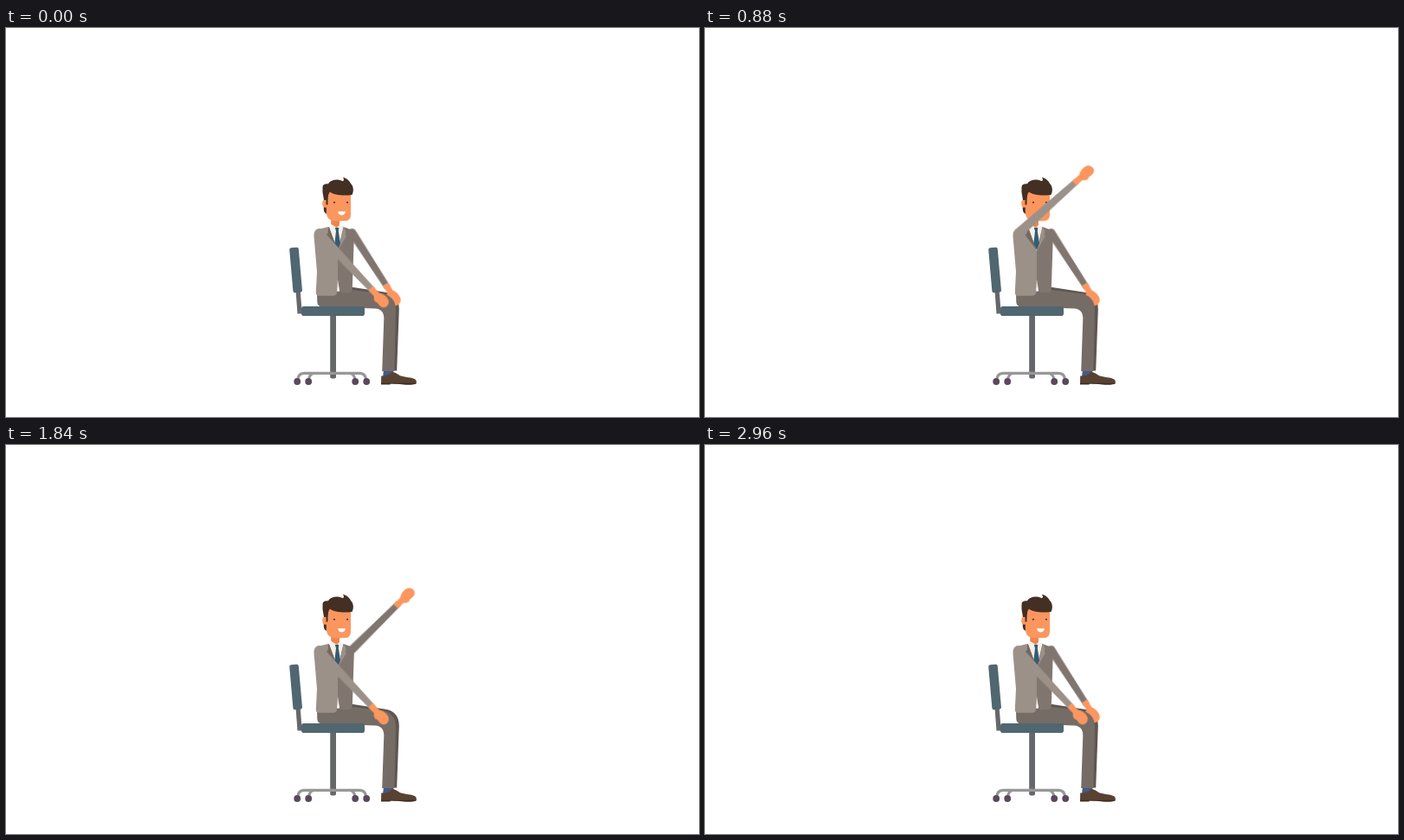
An HTML page for the animation above (3 s loop, 800x450 px).

```html
<!DOCTYPE html>
<html lang="en">
<head>
<meta charset="utf-8">
<title>Seated arm raises</title>
<style>
  html, body { margin: 0; width: 100%; height: 100%; overflow: hidden; background: #fff; }
  svg { display: block; width: 100vw; height: 100vh; }

  .arm { animation: 3s infinite cubic-bezier(.22, 0, .32, 1); transform-origin: 0 0; }
  .near .arm { animation-name: near-raise; }
  .far .arm { animation-name: far-raise; }

  @keyframes near-raise {
    0%, 45.333%, 100% { transform: rotate(46.8deg); }
    18.667%, 24% { transform: rotate(-90deg); }
  }
  @keyframes far-raise {
    0%, 52%, 98.667%, 100% { transform: rotate(57.2deg); }
    72%, 78.667% { transform: rotate(-85deg); }
  }

  .skin { fill: #fb965f; }
  .hair { fill: #432f23; }
  .light { fill: #9c9188; }
  .mid { fill: #81766f; }
  .trouser { fill: #766c66; }
  .shade { fill: #5f5651; }
  .teal { fill: #506670; }
  .metal { fill: #66676a; }
  .wheel { fill: #5b485c; }
  .base { fill: none; stroke: #979798; stroke-width: 3.2; }
</style>
</head>
<body>
<svg viewBox="0 0 800 450">
  <defs>
    <!-- Fist with thumb, starting at the cuff and pointing along +x -->
    <path id="hand" class="skin" d="M-3-3.5H8C11-6 15-6.6 19-6C23-5.4 25.2-2.5 25 .8C24.8 4.2 22.5 6.2 19 6.2L14.5 5.8C12.5 7.3 9 7 7.5 4.6L6 3.6H-3Z"/>
    <g id="half-base">
      <path class="base" d="M336.500 408C337 402 339.500 399.300 344 399.300H377"/>
      <path class="base" d="M349.500 408C349.500 403.500 351 400.500 355 399.500"/>
      <circle class="wheel" cx="336.200" cy="409" r="3.900"/>
      <circle class="wheel" cx="349.200" cy="409" r="3.900"/>
    </g>
  </defs>

  <g id="chair">
    <path class="metal" d="M334.500 304H339.700L341.800 330.500H336.500Z"/>
    <rect class="teal" x="-5.300" y="-26" width="10.600" height="52" rx="2.200" transform="translate(334.600 280) rotate(-5)"/>
    <path class="metal" d="M374.200 332H381V403.500Q381 405.500 379 405.500H376.200Q374.200 405.500 374.200 403.500Z"/>
    <use href="#half-base"/>
    <use href="#half-base" transform="matrix(-1 0 0 1 752.400 0)"/>
  </g>

  <path class="shade" d="M385 298L401 300L437 305.500C447 306.500 454 313 453.800 325L451.200 396.500H440L442 322L385 312Z"/>

  <g class="far" transform="translate(399.500 236.700)">
    <g class="arm">
      <path class="mid" d="M0-4.700L76-3.400V3.400L0 4.700A4.700 4.700 0 0 1 0-4.700Z"/>
      <use href="#hand" x="74"/>
    </g>
  </g>

  <g id="legs">
    <path fill="#42598a" d="M436 395H447.500L446.500 404H435Z"/>
    <path fill="#5a4232" d="M433.200 402.500C438 403 442 402 445.500 398.300C448.500 397.300 451.500 400.500 455 402.200C460 404 469 404 472.500 406.500C474 407.700 474.200 410 473.500 411.500H433Z"/>
    <path fill="#3f2d23" d="M433 410.700H473.800C473 412.200 470 412.700 464 412.700C457 412.700 452 411.500 443.500 411.500V412.600H433Z"/>
    <path class="trouser" d="M359 307L390 304L401 303L432 307C443 308 450 314 450 326L448.300 397H434.200L436.300 336C436.300 329 433 325 426 324.600L365 322.500Q359.500 322 359.300 317Z"/>
  </g>
  <rect class="teal" x="341" y="322" width="73" height="11" rx="2.800"/>

  <g id="torso">
    <path fill="#f4f1e9" d="M373 229L390 229L387 300H380Z"/>
    <path class="mid" d="M389.500 230L397.500 233Q402 235.500 401.800 241L399.800 302Q399.600 306 396 306H388.500Q385 306 384.700 302L383 291V258Z"/>
    <path class="light" d="M372 230L361 232.800Q355 235 355.500 241L359 282L357.800 306Q357.800 309.500 361 309.700H378Q382 309.500 382.200 305L383 291V258Z"/>
    <path fill="#746961" d="M372 230L373.500 231L383 257L369.500 239.500L371.800 237Z"/>
    <path fill="#f4f1e9" d="M373 229.500H380L383 257Z"/>
    <path class="light" d="M390 230L392.500 235.500L391.500 239L392.800 241L383.300 257Z"/>
    <path fill="#365b70" d="M379.800 231H384.300L383.800 235L386 249L383 257L379.400 249L381 235Z"/>
  </g>

  <g id="head">
    <path fill="#ec8552" d="M375.200 220H385V228L382 231L375.200 227Z"/>
    <path class="hair" d="M366.800 206H371V215.500Q367 214 366.800 210Z"/>
    <ellipse class="skin" cx="368.500" cy="203" rx="3.300" ry="4.700"/>
    <path class="skin" d="M370 187H398V216Q398 223.300 391 223.300H380Q370.500 223 369.800 214Z"/>
    <path class="hair" d="M367 199L365.500 190V184Q365.500 179.800 372 180.200C375 175 383 174.300 389 177.200Q391 175.500 388.800 172.800C394 174 396.500 177 398 180C401.500 183 401.600 189 399.500 193C390 194.300 378 193.500 374 189.500C371.500 192.500 371.700 197 371.500 204.500H369.500V199Z"/>
    <circle cx="379" cy="201.800" r="1.050" fill="#40332b"/>
    <circle cx="394" cy="201.800" r="1.050" fill="#40332b"/>
    <path fill="#fff" d="M383 212.300H391.800C391.500 218 383.700 218 383 212.300Z"/>
  </g>

  <g class="near" transform="translate(361.400 237.600)">
    <g class="arm">
      <path class="light" d="M0-5.500L91-3.500V3.500L0 5.500A5.500 5.500 0 0 1 0-5.500Z"/>
      <use href="#hand" x="90"/>
    </g>
  </g>
</svg>
</body>
</html>
```
